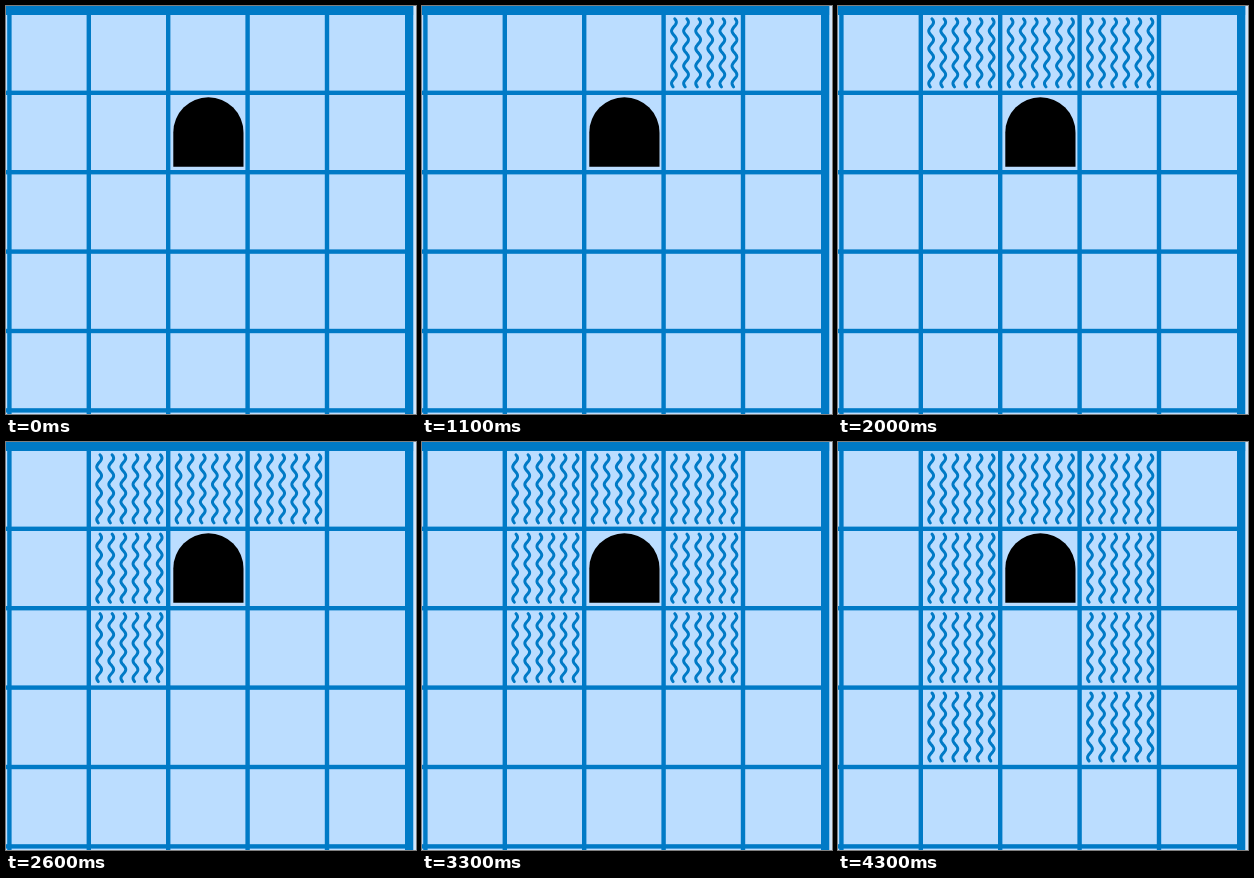
These frames come from a looping animation (410x408 px, 4400 ms). An HTML page with a canvas:

```html
<!DOCTYPE html>
<html lang="en">
<head>
<meta charset="utf-8">
<title>Grid walls</title>
<style>
  html, body { margin: 0; width: 100%; height: 100%; overflow: hidden; }
  canvas { display: block; }
</style>
</head>
<body>
<canvas id="stage" width="410" height="408"></canvas>
<script>
const ctx = document.getElementById('stage').getContext('2d');
const LOOP = 4400;
const CELL = 79.4;
const BLUE = '#007ac6';
const PALE = '#bbddff';

// Each wavy tile: [start ms, column, row]
const tiles = [
  [1100, 3, 0], [1500, 2, 0], [1800, 1, 0],
  [2200, 1, 1], [2600, 1, 2],
  [3000, 3, 1], [3300, 3, 2], [3700, 3, 3],
  [4100, 1, 3]
];

function rect(color, x, y, w, h) {
  ctx.fillStyle = color;
  ctx.fillRect(x, y, w, h);
}

function drawBoard() {
  rect(PALE, 0, 0, 410, 408);
  for (let i = 0; i < 5; i++) {
    rect(BLUE, 1.2 + i * CELL, 0, 4.4, 408);
    rect(BLUE, 0, 84.6 + i * CELL, 400, 4.4);
  }
  rect(BLUE, 0, 0, 407.5, 9);
  rect(BLUE, 399, 0, 8.5, 408);
  rect('#d3e6fa', 407.5, 0, 2.5, 408);
}

function drawDoor() {
  ctx.fillStyle = '#000';
  ctx.beginPath();
  ctx.arc(202.4, 126.4, 35.1, Math.PI, 0);
  ctx.lineTo(237.5, 160.8);
  ctx.lineTo(167.3, 160.8);
  ctx.fill();
}

function drawWaves(column, row) {
  const cx = 123.4 + (column - 1) * CELL;
  const cy = 46.8 + row * CELL;
  ctx.strokeStyle = BLUE;
  ctx.lineWidth = 3;
  ctx.lineCap = ctx.lineJoin = 'round';
  ctx.beginPath();
  for (let i = 0; i < 6; i++) {
    const x = cx + (i - 2.5) * 12.1;
    for (let y = -34; y <= 34; y++) {
      const px = x + 2.4 * Math.sin(y * 2 * Math.PI / 17.5);
      if (y === -34) ctx.moveTo(px, cy + y);
      else ctx.lineTo(px, cy + y);
    }
  }
  ctx.stroke();
}

function draw(now) {
  const time = now % LOOP;
  drawBoard();
  drawDoor();
  for (const [start, column, row] of tiles) {
    if (time >= start) drawWaves(column, row);
  }
  requestAnimationFrame(draw);
}

requestAnimationFrame(draw);
</script>
</body>
</html>
```
